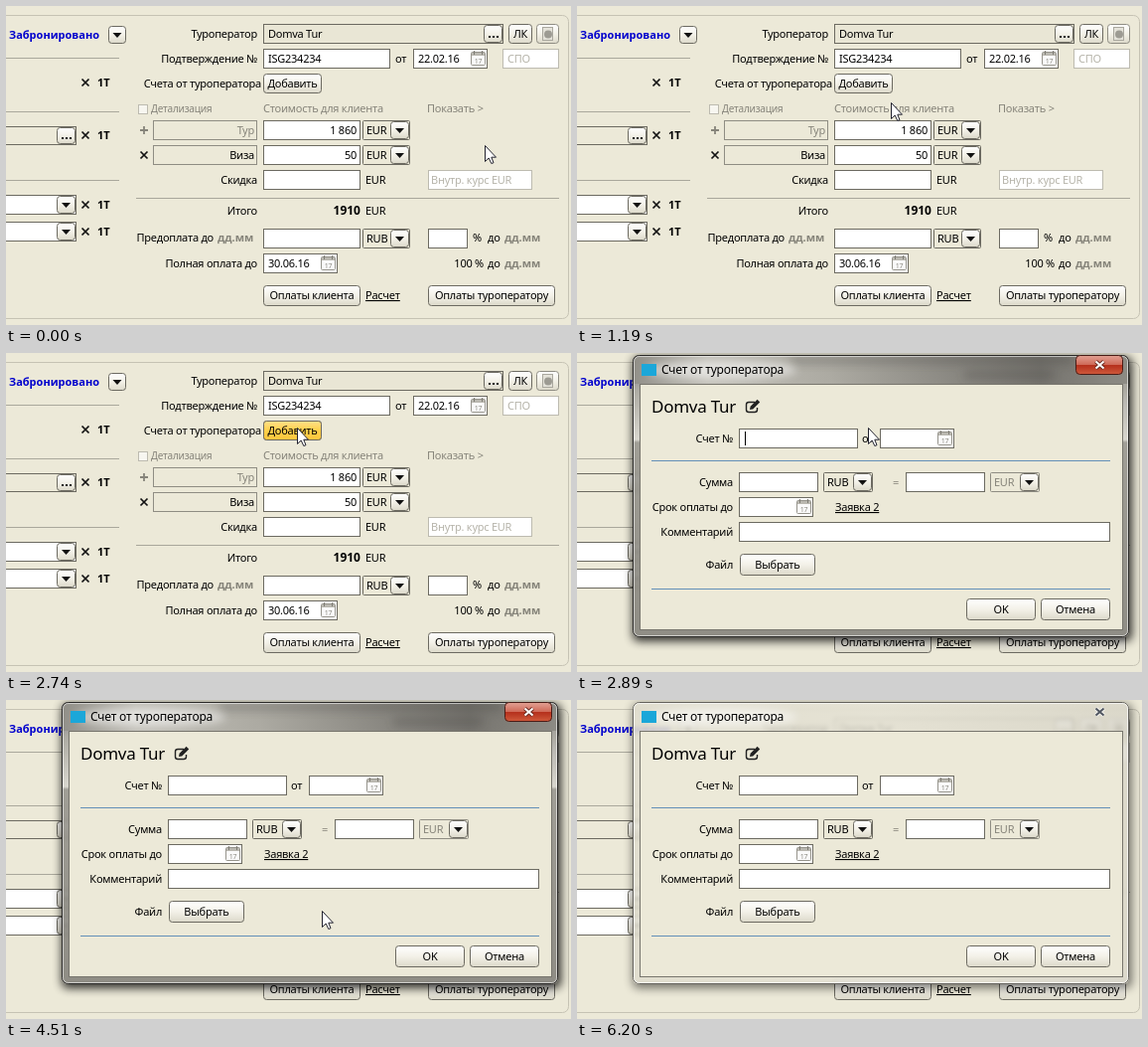
These frames come from a looping animation (569x321 px, 7.99 s). An HTML page:

```html
<!DOCTYPE html>
<html lang="ru">
<head>
<meta charset="utf-8">
<title>Счет от туроператора</title>
<style>
html, body { margin: 0; width: 100%; height: 100%; overflow: hidden; background: #ece9d8; }
svg { display: block; }
text { font: 11px "Noto Sans", "Open Sans", sans-serif; letter-spacing: -.25px; fill: #000; white-space: pre; }
.end { text-anchor: end; }
.mid { text-anchor: middle; }
.bold { font-weight: 700; letter-spacing: 0; }
.gray { fill: #86847a; }
.pale { fill: #b6b4aa; }
.blue { fill: #0000cd; }
.small { font-size: 10px; }
.large { font-size: 12px; }
.head { font-size: 17px; }
.link { text-decoration: underline; }
.day { font-size: 7px; fill: #8a8880; }
</style>
</head>
<body>
<svg id="stage" width="569" height="321" viewBox="0 0 569 321"></svg>
<script>
const LOOP = 7990;
const BEIGE = '#ece9d8', EDGE = '#6c6a61', SOFT = '#bdbbb0', RULE = '#6390b8';
const OPERATOR = 'Domva Tur';

const text = (x, y, s, cls = '') => `<text x="${x}" y="${y}" class="${cls}">${s}</text>`;
const path = (d, stroke, width = 1, fill = 'none') =>
  `<path d="${d}" stroke="${stroke}" stroke-width="${width}" fill="${fill}"/>`;
const line = (x1, x2, y, color) => path(`M${x1} ${y + .5}H${x2}`, color);
const box = (x, y, w, h, fill = '#fff', stroke = EDGE, r = 0) =>
  `<rect x="${x + .5}" y="${y + .5}" width="${w - 1}" height="${h - 1}" rx="${r}" fill="${fill}" stroke="${stroke}"/>`;
const button = (x, y, w, h, label, fill = 'url(#btn)') =>
  box(x, y, w, h, fill, EDGE, 3) + text(x + w / 2, y + Math.floor(h / 2) + 4, label, 'mid');
const arrow = (x, y, w = 19, h = 18, fill = 'url(#btn)') =>
  box(x, y, w, h, fill, EDGE, 3) +
  path(`M${x + w / 2 - 4.5} ${y + h / 2 - 2}h9l-4.5 5z`, 'none', 0, '#111');
const combo = (x, y, w, label, cls = '') =>
  box(x, y, w, 20, BEIGE, cls ? '#8f8d83' : EDGE, 1) +
  text(x + 4, y + 14, label, cls) + arrow(x + w - 20, y + 1);
const cross = (x, y) => path(`M${x - 3.5} ${y - 3.5}l7 7m0 -7l-7 7`, '#111', 1.7);
const dots = (x, y) => [0, 4, 8].map(d => `<rect x="${x + d}" y="${y}" width="2" height="2" fill="#111"/>`).join('');
const calendar = (x, y) =>
  box(x, y + 1, 15, 14, '#fafafa', '#96948c', 1) +
  path(`M${x + 1} ${y + 3.5}h13`, '#bab8b0', 3) +
  path(`M${x + 3.5} ${y}v4m8 -4v4`, '#7f7d75') + text(x + 7.5, y + 12.5, '17', 'mid day');
const dateBox = (x, y, value = '') =>
  box(x, y, 75, 20) + text(x + 5, y + 14, value) + calendar(x + 58, y + 2);

const defs = `<defs>
  <linearGradient id="btn" x2="0" y2="1"><stop stop-color="#fff"/><stop offset=".5" stop-color="#f3f1e8"/><stop offset="1" stop-color="#dcd9ca"/></linearGradient>
  <linearGradient id="amber" x2="0" y2="1"><stop stop-color="#ffe08a"/><stop offset=".5" stop-color="#ffd04a"/><stop offset="1" stop-color="#fcc63c"/></linearGradient>
  <linearGradient id="red" x2="0" y2="1"><stop stop-color="#e3a295"/><stop offset=".48" stop-color="#cf6a58"/><stop offset=".52" stop-color="#b5301c"/><stop offset="1" stop-color="#cf5a3c"/></linearGradient>
  <linearGradient id="titleOn"><stop stop-color="#8f8d86"/><stop offset=".15" stop-color="#c6c4bc"/><stop offset=".4" stop-color="#aeaca4"/><stop offset=".65" stop-color="#85837d"/><stop offset=".82" stop-color="#6d6b66"/><stop offset="1" stop-color="#8a8881"/></linearGradient>
  <linearGradient id="sidesOn" x2="0" y2="1"><stop stop-color="#85837c"/><stop offset=".3" stop-color="#d6d4cd"/><stop offset=".31" stop-color="#98968f"/><stop offset="1" stop-color="#85837c"/></linearGradient>
  <linearGradient id="glassOff"><stop stop-color="#dddacc"/><stop offset=".5" stop-color="#e3e0d3"/><stop offset="1" stop-color="#d6d3c6"/></linearGradient>
  <filter id="blur"><feGaussianBlur stdDeviation="2"/></filter>
  <filter id="shade" x="-10%" y="-10%" width="120%" height="120%"><feGaussianBlur stdDeviation="5"/></filter>
  <filter id="glow" x="-20%" y="-100%" width="140%" height="300%"><feGaussianBlur stdDeviation="5"/></filter>
  <clipPath id="pane"><rect x="56" y="2" width="500" height="284" rx="6"/></clipPath>
</defs>`;

const statusPanel =
  text(3, 33, 'Забронировано', 'bold blue') + arrow(103, 20, 18, 18) +
  [52, 106, 175].map(y => line(0, 114, y, '#aaa89c')).join('') +
  [77, 130, 200, 227].map(y => cross(80, y) + text(92, y + 4, '1Т', 'bold')).join('') +
  box(-5, 121, 76, 19, BEIGE) + box(51, 122, 19, 17, 'url(#btn)', EDGE, 3) + dots(56, 132) +
  [190, 217].map(y => box(-5, y, 76, 20) + arrow(51, y + 1)).join('');

const priceRow = (y, label, price, cls) =>
  box(148, y, 105, 20, BEIGE, '#8f8d83') + text(250, y + 14, label, 'end ' + cls) +
  box(259, y, 98, 20) + text(353, y + 14, price, 'end') + combo(359, y, 48, 'EUR');

const orderPanel =
  text(253, 32, 'Туроператор', 'end') + box(259, 18, 242, 20, '#e9e6d5') + text(264, 32, OPERATOR) +
  box(481, 19, 19, 18, 'url(#btn)', EDGE, 3) + dots(486, 30) + button(506, 18, 24, 20, 'ЛК') +
  box(534, 18, 23, 20, 'url(#btn)', '#8f8d83', 3) + box(540, 21, 11, 14, '#e4e2d9', '#aaa89f') +
  '<circle cx="546" cy="28.5" r="4" fill="#9d9b93"/>' +
  text(253, 57, 'Подтверждение №', 'end') + box(259, 43, 128, 20) + text(264, 57, 'ISG234234') +
  text(392, 57, 'от') + dateBox(410, 43, '22.02.16') +
  box(500, 43, 57, 20, '#fff', SOFT) + text(505, 57, 'СПО', 'pale') +
  text(257, 82, 'Счета от туроператора', 'end') + button(259, 68, 59, 20, 'Добавить') +
  box(133, 99, 10, 10, '#f7f6f0', SOFT) + text(146, 107, 'Детализация', 'gray small') +
  text(259, 107, 'Стоимость для клиента', 'gray') + text(424, 107, 'Показать &gt;', 'gray') +
  path('M135 125h8m-4 -4v8', '#86847a', 1.8) + cross(139, 150) +
  priceRow(115, 'Тур', '1 860', 'gray') + priceRow(140, 'Виза', '50', '') +
  text(253, 179, 'Скидка', 'end') + box(259, 165, 98, 20) + text(362, 179, 'EUR') +
  box(425, 165, 105, 20, '#fff', SOFT) + text(428, 179, 'Внутр. курс EUR', 'pale') +
  line(131, 557, 193, '#a9a79b') +
  text(253, 210, 'Итого', 'end') + text(357, 210, '1910', 'end bold large') + text(362, 210, 'EUR') +
  text(209, 237, 'Предоплата до', 'end') + text(213, 237, 'дд.мм', 'bold gray') +
  box(259, 224, 98, 20) + combo(359, 224, 48, 'RUB') + box(425, 224, 40, 20) + text(470, 237, '%') +
  text(253, 263, 'Полная оплата до', 'end') + dateBox(259, 249, '30.06.16') + text(481, 263, '100 %', 'end') +
  [237, 263].map(y => text(485, y, 'до') + text(502, y, 'дд.мм', 'bold gray')).join('') +
  button(259, 281, 98, 21, 'Оплаты клиента') + text(362, 295, 'Расчет', 'link') +
  button(425, 281, 128, 21, 'Оплаты туроператору');

const form = `<g id="form"><rect width="569" height="321" fill="${BEIGE}"/>` +
  box(-10, 9, 577, 306, 'none', '#c6c3b4', 6) + statusPanel + orderPanel + '</g>';

const closeMark = (color, halo) => {
  const d = 'M522.5 8.5l8 7m0 -7l-8 7';
  return path(d, halo, 4) + path(d, color, 2);
};

const pane = (fill, opacity, height = 284) =>
  `<rect x="56" y="2" width="500" height="${height}" fill="${fill}" opacity="${opacity}"/>`;
const activeGlass = pane('url(#sidesOn)', .9) + pane('url(#titleOn)', .85, 29) +
  `<g filter="url(#glow)" opacity=".45">${path('M215 7H500M390 22H480', '#45433f', 5)}</g>`;
const idleGlass = pane('url(#glassOff)', .75);

function windowFrame(id, { glass, shadow, edge, shine, close }) {
  return `<g id="${id}">
    <rect x="56" y="4" width="503" height="286" rx="6" filter="url(#shade)" opacity="${shadow}"/>
    <g clip-path="url(#pane)"><use href="#form" filter="url(#blur)"/>${glass}
    <ellipse cx="146" cy="17" rx="75" ry="9" fill="#fff" opacity=".6" filter="url(#glow)"/></g>` +
    box(56, 2, 500, 284, 'none', edge, 6) + box(57, 3, 498, 282, 'none', shine, 5) + close + '</g>';
}

const activeFrame = windowFrame('activeFrame', {
  glass: activeGlass, shadow: .8, edge: '#2c2b29', shine: '#ffffff90',
  close: box(502, 2, 48, 20, 'url(#red)', '#4a1c16', 4) + closeMark('#fff', '#6b2b22')
});
const idleFrame = windowFrame('idleFrame', {
  glass: idleGlass, shadow: .5, edge: '#66645e', shine: '#ffffffb0',
  close: closeMark('#4f5560', '#f4f3ee')
});

const client =
  '<rect x="65" y="11" width="15" height="12" fill="#1ba7d9"/>' +
  text(85, 21, 'Счет от туроператора', 'large') +
  box(63, 31, 487, 248, BEIGE, '#77756d') +
  text(75, 60, OPERATOR, 'head') +
  path('M179 49.5h-6q-2.5 0-2.5 2.5v5q0 2.5 2.5 2.5h6q2.5 0 2.5-2.5v-2', '#222', 1.4) +
  path('M174 57l.6-3.2 7-7 2.6 2.6-7 7z', 'none', 0, '#222') +
  text(157, 90, 'Счет №', 'end') + box(163, 76, 120, 20) + text(287, 90, 'от') + dateBox(305, 76) +
  line(75, 537, 108, RULE) +
  text(157, 134, 'Сумма', 'end') + box(163, 120, 80, 20) + combo(248, 120, 50, 'RUB') +
  text(318, 134, '=', 'gray') + box(331, 120, 80, 20) + combo(416, 120, 50, 'EUR', 'gray') +
  text(157, 159, 'Срок оплаты до', 'end') + dateBox(163, 145) + text(260, 159, 'Заявка 2', 'link') +
  text(157, 184, 'Комментарий', 'end') + box(163, 170, 374, 20) +
  text(157, 217, 'Файл', 'end') + button(164, 202, 76, 22, 'Выбрать') +
  line(75, 537, 237, RULE) +
  button(392, 247, 70, 22, 'OK') + button(467, 247, 70, 22, 'Отмена');

document.getElementById('stage').innerHTML = defs + form +
  `<g id="comboHover">${arrow(387, 116, 19, 18, 'url(#amber)')}</g>` +
  `<g id="addHover">${button(259, 68, 59, 20, 'Добавить', 'url(#amber)')}</g>` +
  `<g id="addPressed">${button(259, 68, 59, 20, 'Добавить', '#f2b632')}</g>` +
  activeFrame + idleFrame +
  `<g id="client">${client}</g>` +
  `<g id="caret">${path('M169.5 79v14', '#000')}</g>` +
  `<g id="pointer"><g id="arrowhead">${path('M.5 .5V16.5L4.2 13L6.8 18.5L9 17.7L6.8 12.2H11.5Z', '#23232f', 1, '#fff')}</g></g>`;

// Each step is [time, value]; values hold until the next step.
function play(id, property, steps) {
  const frames = steps.map(([time, value]) =>
    ({ offset: time / LOOP, [property]: value, easing: 'steps(1, end)' }));
  frames.push({ offset: 1, [property]: steps.at(-1)[1] });
  document.getElementById(id).animate(frames, { duration: LOOP, iterations: Infinity });
}
const toggle = (id, ...times) =>
  play(id, 'opacity', [[0, 0], ...times.map((time, i) => [time, (i + 1) % 2])]);

toggle('comboHover', 900, 1050);
toggle('addHover', 1320, 2890);
toggle('addPressed', 2590, 2740);
toggle('activeFrame', 2890, 6200);
toggle('idleFrame', 6200);
toggle('client', 2890);
toggle('caret', 2890, 3300, 3850, 4360, 4800, 5360, 5760, 6200);
play('arrowhead', 'opacity', [[0, 1], [6200, 0]]);
play('pointer', 'transform', [
  [0, 482, 140], [500, 476, 139], [620, 459, 137], [770, 430, 134], [900, 392, 125],
  [1050, 339, 109], [1190, 316, 97], [1320, 303, 84], [1450, 297, 78], [1600, 295, 76],
  [1730, 293, 75], [3460, 292, 74], [3600, 295, 80], [3730, 303, 95], [3850, 311, 113],
  [3970, 314, 130], [4090, 315, 148], [4240, 317, 172], [4360, 318, 196], [4510, 318, 212],
  [4650, 318, 214]
].map(([time, x, y]) => [time, `translate(${x}px, ${y}px)`]));
</script>
</body>
</html>
```
